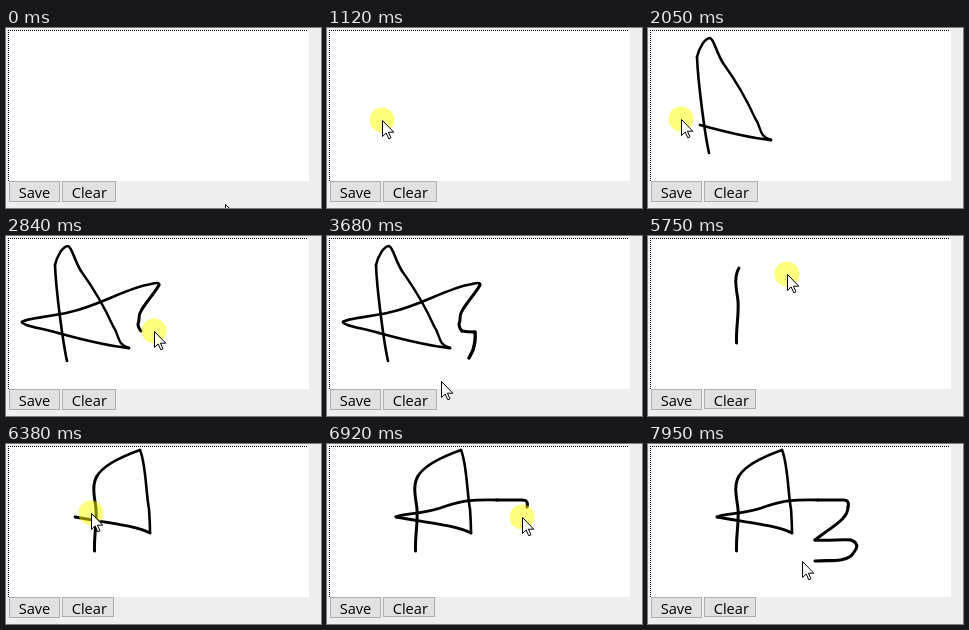
An HTML page for the animation above (8 s loop, 315 by 180 pixels).

```html
<!DOCTYPE html>
<html lang="en">
<head>
<meta charset="utf-8">
<title>Signature pad</title>
<style>
html, body { margin: 0; width: 100%; height: 100%; overflow: hidden; background: #eee; }
svg { display: block; width: 100vw; height: 100vh; }
text { font: 14.6px "Open Sans", "Noto Sans", sans-serif; text-anchor: middle; fill: #000; }
#ink path { fill: none; stroke: #000; stroke-linecap: round; }
</style>
</head>
<body>
<svg viewBox="0 0 315 180">
  <rect width="315" height="180" fill="#eee"/>
  <rect x="2" y="2" width="301" height="151" fill="#fff"/>
  <path d="M2 2.5H302M2.5 2V153" fill="none" stroke="#000" stroke-dasharray="1 1" shape-rendering="crispEdges"/>
  <g id="ink"></g>
  <rect x="3.5" y="153.5" width="50" height="20" fill="#e1e1e1" stroke="#adadad"/>
  <text x="28.5" y="170">Save</text>
  <rect id="clear" y="153.5"/>
  <g id="inset" fill="none">
    <path d="M55.5 173V153.5H109" stroke="#999"/>
    <path d="M108.5 154V172.5H56" stroke="#eee"/>
  </g>
  <text x="83.3" y="170">Clear</text>
  <g id="pointer">
    <circle id="halo" r="12.5" fill="#ff0" fill-opacity=".5"/>
    <path d="M.5 .5V16.5L4.2 13 6.8 18.8 9 17.8 6.4 12.2H11.8Z" fill="#fff" stroke="#000"/>
  </g>
</svg>
<script>
// The screen refreshes in steps; all times below are counted in them.
const LOOP = 8000, STEP = 77.2, LEAD = 42;
const PRESS = 60, CLEARED = 62, LEFT_BUTTON = 66;

// Each leg of the pointer's way: start, end, path, and a line width if it draws.
const legs = [
  [0, 7, "M219 177Q80 135 31 110"],
  [7, 12, "M31 110Q45 120 61 125"],

  [14, 17, "M61 125C57 107 50 55 49 29", 2.6],
  [18, 21, "M49 29C51 20 57 10 62 10C66 11 68 24 75 35", 2.6],
  [21, 24.5, "M75 35C88 53 98 70 107 90C114 100 110 108 123 112", 2.4],
  [24.5, 26, "M123 112C112 111 85 106 52 97", 2.8],
  [26, 28, "M52 97C35 92 17 90 16 86", 2.6],
  [29, 35, "M16 86C20 82 45 81 64 76C95 69 120 52 145 48C149 47 154 46 153 49", 2.7],
  [35, 36, "M153 49C149 57 138 68 134 77C132 82 134 84 132 88Q132 92 135 95", 3],
  [36, 37, "M135 95Q140 96 148 96", 3.2],
  [37, 43, "M148 96Q149 104 146 114L142 122", 3.4],

  [43, 44, "M142 122L140 127"],
  [46, 50, "M140 127L89 164"],
  [52, 55, "M89 164L88 166"],
  [63, 69, "M88 166V72"],
  [70, 72, "M88 72L89 92"],

  [72.9, 74, "M88.5 107C88 90 91 80 90 65C89 55 85 42 91 32", 3],
  [74, 74.2, "M91 32C98 20 120 11 134 6", 2.5],
  [74.2, 76.2, "M134 6C140 20 140 50 143 65Q144 80 144 89", 2.6],
  [79, 82, "M144 89C130 82 110 80 69 73", 2.8],
  [82, 88, "M69 73C75 69 97 71 119 62C140 55 150 56 170 56", 2.8],
  [88, 89, "M170 56H195Q202 56 200 63", 3],
  [89, 93, "M200 63C200 75 185 82 167 96", 3],
  [93, 99, "M167 96C178 97 198 95 203 96C213 100 208 106 203 112C195 118 183 116 167 117", 3.1],

  [99, 100, "M167 117H162"],
  [100, 103, "M162 117L154 118"]
].map(makeLeg);

const presses = [[14, 43], [PRESS, PRESS + 1], [75, 100]];
const stalls = [[73, 74], [78, 79]];

function $(id) { return document.getElementById(id); }

function set(el, attrs) {
  for (const name in attrs) el.setAttribute(name, attrs[name]);
}

function show(el, on) {
  set(el, { visibility: on ? "visible" : "hidden" });
}

function makeLeg([from, to, d, width]) {
  const el = document.createElementNS("http://www.w3.org/2000/svg", "path");
  set(el, { d });
  const length = el.getTotalLength();
  if (width) {
    set(el, { "stroke-width": width });
    $("ink").append(el);
  }
  return { el, from, to, width, length };
}

function inside(k, spans) {
  return spans.some(([a, b]) => k >= a && k <= b);
}

function progress(leg, k) {
  return Math.max(0, Math.min(1, (k - leg.from) / (leg.to - leg.from)));
}

function drawInk(limit, k) {
  for (const leg of legs.filter(l => l.width)) {
    const u = progress(leg, limit);
    const erased = k >= CLEARED && leg.from < CLEARED;
    show(leg.el, u > 0 && !erased);
    set(leg.el, { "stroke-dasharray": `${u * leg.length} 999` });
  }
}

function drawPointer(k, down) {
  const leg = legs.filter(l => l.from <= k).pop();
  const p = leg.el.getPointAtLength(progress(leg, k) * leg.length);
  set($("pointer"), { transform: `translate(${Math.round(p.x - .5)} ${Math.round(p.y - 1)})` });
  show($("halo"), down);
}

function drawClear(k) {
  const active = k >= PRESS && k < LEFT_BUTTON, used = k >= LEFT_BUTTON;
  const hover = k < 50 || used ? 0 : Math.min(1, .3 + (k - 50) * .14);
  const tone = (from, to) => `rgb(${from.map((c, i) => Math.round(c + (to[i] - c) * hover))})`;
  set($("clear"), {
    x: active ? 55.5 : 56.5,
    width: used ? 51 : 53,
    height: active || used ? 19 : 20,
    fill: active ? "#27b4ab" : tone([225, 225, 225], [229, 241, 251]),
    stroke: active ? "none" : tone([173, 173, 173], [0, 120, 215])
  });
  show($("inset"), active);
}

function draw(k) {
  const down = inside(k, presses);
  // Ink trails the pen by one step while the button is held.
  drawInk(down ? k - 1 : k, k);
  drawClear(k);
  drawPointer(k, down);
}

let last = -1;
function tick() {
  let k = Math.floor((performance.now() % LOOP + LEAD) / STEP);
  while (inside(k, stalls)) k--;
  if (k !== last) draw(last = k);
  requestAnimationFrame(tick);
}
tick();
</script>
</body>
</html>
```
